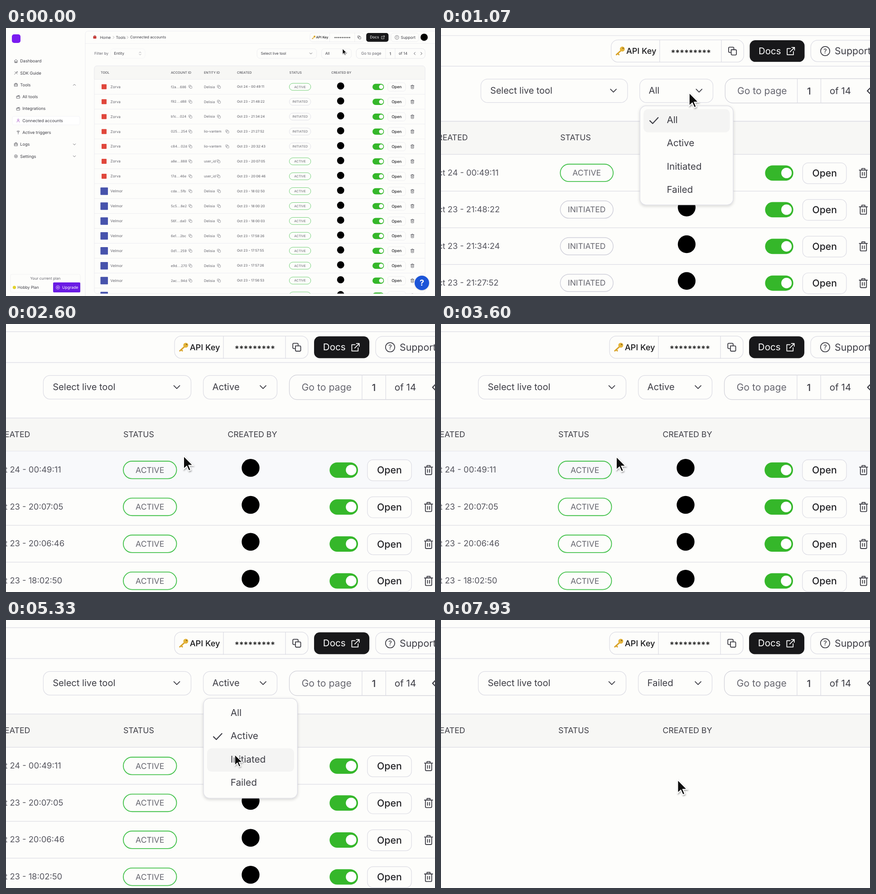
Animation, 947 px wide and 592 px high, one loop 8000 ms. Source, as an HTML page:

```html
<!DOCTYPE html>
<html lang="en">
<head>
<meta charset="utf-8">
<title>Connected accounts</title>
<style>
html, body { margin: 0; width: 100%; height: 100%; overflow: hidden; background: #fdfdfb; }
svg { display: block; width: 100vw; height: 100vh; font-family: Inter, "Open Sans", sans-serif; text-rendering: geometricPrecision; }
text { white-space: pre; }
</style>
</head>
<body>
<svg viewBox="0 0 947 592" preserveAspectRatio="none">
  <defs>
    <clipPath id="table"><rect x="195" y="83.7" width="730" height="503" rx="6"/></clipPath>
    <filter id="soft" x="-20%" y="-20%" width="140%" height="150%">
      <feDropShadow dx="0" dy="1" stdDeviation="1.2" flood-opacity=".16"/>
    </filter>
    <filter id="cursorShadow" x="-50%" y="-30%" width="220%" height="180%">
      <feDropShadow dx="0.6" dy="1.2" stdDeviation="0.9" flood-opacity=".35"/>
    </filter>
  </defs>
  <g id="camera">
    <g id="page"></g>
    <g id="rows" clip-path="url(#table)"></g>
    <g id="help"></g>
    <g id="filter"></g>
    <g id="cursor" filter="url(#cursorShadow)">
      <path d="M0 0V16L3.8 12.5 6.2 18 8.7 17 6.3 11.5H11.4Z" fill="#080808" stroke="#fff" stroke-width="1.1"/>
    </g>
  </g>
</svg>
<script>
const LOOP = 8000, ZOOM = 2.48, FOCUS_X = 873;
const ROW_TOP = 113.4, ROW_H = 32.92, ITEM_TOP = 72.8, ITEM_H = 20.77;
const INK = '#3d3d45', GREY = '#66666f', LINE = '#dcdce4', PAPER = '#fdfdfb';
const OPTIONS = ['All', 'Active', 'Initiated', 'Failed'];
const $ = id => document.getElementById(id);

// Drawing helpers; text is centred vertically on y.
const text = (s, x, y, size = 8.2, fill = INK, weight = 400, anchor = 'start') =>
  `<text x="${x}" y="${y + size * 0.36}" font-size="${size}" fill="${fill}" font-weight="${weight}" text-anchor="${anchor}">${s}</text>`;
const box = (x, y, w, h, r = 6, fill = PAPER, stroke = LINE, width = 0.5) =>
  `<rect x="${x}" y="${y}" width="${w}" height="${h}" rx="${r}" fill="${fill}" stroke="${stroke}" stroke-width="${width}"/>`;
const dot = (x, y, r, fill, stroke = 'none', width = 0.7) =>
  `<circle cx="${x}" cy="${y}" r="${r}" fill="${fill}" stroke="${stroke}" stroke-width="${width}"/>`;
const icon = (d, x, y, stroke = INK, width = 0.75) =>
  `<path transform="translate(${x} ${y})" d="${d}" fill="none" stroke="${stroke}" stroke-width="${width}" stroke-linecap="round" stroke-linejoin="round"/>`;

const DOWN = 'M-2.6-1.3L0 1.3 2.6-1.3', UP = 'M-2.6 1.3L0-1.3 2.6 1.3';
const LEFT = 'M1.3-2.7L-1.3 0 1.3 2.7', RIGHT = 'M-1.3-2.7L1.3 0-1.3 2.7';
const COPY = 'M-1.2-1.2H2.6Q3.5-1.2 3.5-.3V2.6Q3.5 3.5 2.6 3.5H-.3Q-1.2 3.5-1.2 2.6ZM-1.2 1.2H-2.6Q-3.5 1.2-3.5.3V-2.6Q-3.5-3.5-2.6-3.5H.3Q1.2-3.5 1.2-2.6V-1.2';
const TRASH = 'M-3.6-2.7H3.6M-1.4-2.7V-4.1H1.4V-2.7M-2.8-2.7V3.2Q-2.8 4-2 4H2Q2.8 4 2.8 3.2V-2.7M-.9-.6V2M.9-.6V2';
const EXTERNAL = 'M-.3-2.3H-3.2V3.3H2.4V.4M.9-3.3H3.4V-.8M3.4-3.3L-.6.7';
const HOUSE = 'M-3.6 0L0-3.7 3.6 0M-2.8-.8V3.6H2.8V-.8M-1 3.6V1H1V3.6';
const PEN = 'M-3.3 3.3L1.4-1.4M-2.3-2.8L3 2.5M2.5-3.2V-1.2M1.5-2.2H3.5';
const CASE = 'M-3.4-1H3.4V3.2H-3.4ZM-3-1.2L2.8-3M-1.4-1L-.8-2.4M1-1L1.6-2.7';
const BOX = 'M-3.2-2.3H3.2V3.2H-3.2ZM-1.3-2.3V-3.6H1.3V-2.3M-3.2.3H3.2';
const USER = 'M0-3.4A1.7 1.7 0 010 .1 1.7 1.7 0 010-3.4M-3 3.6Q-2.6.4 0 .6 2.6.4 3 3.6';
const SPARK = 'M0 3.6V-.8M0-.8L-3-2.6M0-.8L3-2.6M-1.8-3.4H1.8';
const GEAR = 'M0-3.6L3.1-1.8V1.8L0 3.6-3.1 1.8V-1.8ZM0-1.2A1.2 1.2 0 010 1.2 1.2 1.2 0 010-1.2';

function sidebar() {
  const items = [
    ['Dashboard', HOUSE, 0], ['SDK Guide', PEN, 0], ['Tools', BOX, 0, UP], ['All tools', CASE, 1],
    ['Integrations', CASE, 1], ['Connected accounts', USER, 1], ['Active triggers', SPARK, 1],
    ['Logs', BOX, 0, DOWN], ['Settings', GEAR, 0, DOWN]
  ];
  return box(13, 14, 19, 19, 5, '#7a1cf0', 'none') +
    box(14, 195, 149, 19, 4, '#fff', '#e6e6ee') +
    items.map(([label, shape, nested, arrow], i) => {
      const y = 73 + i * 26.3, x = nested ? 27 : 22;
      return icon(shape, x, y, i === 5 ? '#a04cc0' : INK) + text(label, x + 9.3, y, 9.15) +
        (arrow ? icon(arrow, 151, y) : '');
    }).join('') +
    box(10, 544, 154, 40, 3, PAPER, '#e6e6e8') + text('Your current plan', 87, 553, 8.2, GREY, 400, 'middle') +
    dot(18.5, 573, 3.6, '#e3d32c') + text('Hobby Plan', 25.5, 573, 8.7) +
    box(104, 562, 60, 22, 2, '#6a1be4', 'none') + dot(114.5, 573, 3.9, 'none', '#fff') +
    icon('M-1.8 0H1.8M0-1.8V1.8', 114.5, 573, '#fff') + text('Upgrade', 124, 573, 8.6, '#fff');
}

function topBar() {
  return icon('M175 592V14Q175 6.8 182 6.8H947M175 34.3H947', 0, 0, LINE, 0.5) +
    box(192.5, 18, 7, 5.5, 1, '#c73b36', 'none') + icon('M-1.5 0V-1.5H1.5V0', 196, 18, '#8d2b2b') +
    text('Home', 207.5, 20.5, 8.5) + icon(RIGHT, 237.5, 20.7, GREY, 0.5) +
    text('Tools', 242.5, 20.5, 8.5) + icon(RIGHT, 268.5, 20.7, GREY, 0.5) +
    text('Connected accounts', 274, 20.5, 8.1) +
    box(671, 10.7, 118.9, 19.9) + icon('M714.5 10.7V30.6M769.8 10.7V30.6', 0, 0, LINE, 0.5) +
    icon('M0 0L-4.7 4.2M-3.5 3.1L-2.5 4.2', 680.4, 19.7, '#d9a329', 1.2) + dot(681, 18.9, 2.2, '#e4b43a') +
    dot(681.7, 18.2, 0.6, '#8a651b') + text('API Key', 684.6, 20.6, 7.3, '#18181b', 500) +
    text('*********', 742.5, 22, 7.4, '#222', 600, 'middle') + icon(COPY, 779.8, 20.7) +
    box(795.2, 11, 49.2, 19.4, 5, '#18181a', 'none') + text('Docs', 803.2, 20.5, 8.3, '#fff') +
    icon(EXTERNAL, 832, 20.7, '#fff', 0.7) +
    box(850, 11, 61, 19.2) + dot(862.9, 20.7, 4.1, 'none', INK) + text('?', 862.9, 20.7, 5.8, INK, 500, 'middle') +
    text('Support', 871.4, 20.6, 8.6) + dot(923, 20.4, 8, '#000');
}

function toolBar() {
  return text('Filter by', 195, 56.2, 8.2, GREY) + box(231, 45.8, 76, 21.1, 6, PAPER, '#ececf0') +
    text('Entity', 238.5, 56, 8.4) + icon('M-2-1.4L0-3.4 2-1.4M-2 1.4L0 3.4 2 1.4', 296, 56.2, GREY, 0.6) +
    box(554.2, 45.8, 131.5, 21.1) + text('Select live tool', 562.6, 55.9, 8.1) + icon(DOWN, 673, 56.2) +
    box(773.2, 45.4, 152, 21.9, 7, PAPER, '#cfcfd8') + icon('M837.9 45.4V67.3M859 45.4V67.3', 0, 0, LINE, 0.5) +
    text('Go to page', 784.1, 56.2, 8.55, GREY) + text('1', 848.4, 56.5, 8.6, INK, 500, 'middle') +
    text('of 14', 866.9, 56.4, 8.3) + icon(LEFT, 902, 56.4, INK, 0.9) + icon(RIGHT, 917, 56.4, INK, 0.9);
}

function tableFrame() {
  const columns = [['TOOL', 209], ['ACCOUNT ID', 364], ['ENTITY ID', 437], ['CREATED', 510], ['STATUS', 625.4], ['CREATED BY', 718.3]];
  return box(195, 83.7, 730, 503) +
    `<path d="M195 113.4V90Q195 83.7 201 83.7H919Q925 83.7 925 90V113.4Z" fill="#f7f7f5" stroke="${LINE}" stroke-width=".5"/>` +
    columns.map(([label, x]) => text(label, x, 98.1, 7.15, INK)).join('');
}

const helpButton = () =>
  `<g filter="url(#soft)">${dot(918, 563, 16, '#1e55d8')}</g>` + text('?', 918, 563, 18, '#fff', 700, 'middle');

const NAMES = { d: 'Delisia', l: 'lio-vantem', u: 'user_id' };
const ICON_X = { d: 470, l: 488.5, u: 469 };
const ACCOUNTS = `f2a 686 d 24 00:49:11 A
f92 d88 d 23 21:48:22 I
b1c 024 d 23 21:34:24 I
025 254 l 23 21:27:52 I
c84 02d l 23 20:32:43 I
a8e 888 u 23 20:07:05 A
17d 46e u 23 20:06:46 A
cda 5fb d 23 18:02:50 A
5c5 8e2 d 23 18:00:20 A
56f da0 d 23 18:00:03 A
6e1 2bc d 23 17:58:26 A
0d1 259 d 23 17:57:55 A
e9d 270 d 23 17:57:26 A
2ac 94d d 23 17:56:53 A
7b3 41f d 23 17:56:20 A`.split('\n').map((line, i) => {
  const [head, tail, who, day, time, status] = line.split(' ');
  return { head, tail, who, day, time, active: status === 'A', mail: i < 7 };
});

function accountRow(a, i, hovered) {
  const y = ROW_TOP + (i + 0.5) * ROW_H, label = a.active ? 'ACTIVE' : 'INITIATED';
  return (i === hovered ? box(195.3, y - ROW_H / 2, 729.4, ROW_H, 0, '#f8f9fb', 'none') : '') +
    icon(`M195 ${y + ROW_H / 2}H925`, 0, 0, LINE, 0.5) +
    (a.mail ? box(211, y - 5.5, 11, 11, 1, '#e0473c', 'none') : box(208.5, y - 8, 16.5, 16.5, 1, '#4753ac', 'none')) +
    text(a.mail ? 'Zorva' : 'Velmor', 230.5, y, 8.2, GREY) +
    text(`${a.head}....${a.tail}`, 364, y, 7.5, GREY) + icon(COPY, 407, y, GREY, 0.6) +
    text(NAMES[a.who], 437, y, 7.7, GREY) + icon(COPY, ICON_X[a.who], y, GREY, 0.6) +
    text(`Oct ${a.day} - ${a.time}`, 510, y - 0.2, 7.4, '#55555e') +
    box(625.4, y - 7.7, 47.4, 15.6, 7.8, 'none', a.active ? '#46c24d' : '#cfcfda', a.active ? 0.75 : 0.6) +
    text(label, 649.1, y + 0.1, 7.1, GREY, 400, 'middle') +
    dot(738.7, y - 1.7, 7.95, '#000') +
    box(809, y - 6.6, 25.3, 13.7, 6.8, '#35b72a', 'none') + dot(828.2, y + 0.2, 4.7, '#fff') +
    box(842.7, y - 8.9, 39.2, 18.7, 5) + text('Open', 862.3, y + 0.3, 8.6, '#222226', 500, 'middle') +
    icon(TRASH, 897.1, y + 0.3);
}

const tableRows = (filter, hovered) => ACCOUNTS
  .filter(a => filter === 0 || (filter === 1 && a.active) || (filter === 2 && !a.active))
  .map((a, i) => accountRow(a, i, hovered)).join('');

function statusFilter(selected, open, hovered) {
  const select = box(696.6, 45.8, 65.7, 21.1) + text(OPTIONS[selected], 704.7, 55.9, 8.2) + icon(DOWN, 749.8, 56.2);
  if (!open) return select;
  return select + `<g filter="url(#soft)">${box(696.8, 69.8, 83.6, 88.9, 5.5)}</g>` +
    box(700, ITEM_TOP + hovered * ITEM_H, 77.4, ITEM_H, 4, '#f4f4f3', 'none') +
    OPTIONS.map((name, i) => text(name, 720.9, 82.4 + i * ITEM_H, 8.35)).join('') +
    icon('M-3.7.2L-1.2 2.7 3.7-2.6', 709.4, 83 + selected * ITEM_H, INK, 0.9);
}

// Pointer stops: time, x, y in page units.
const STOPS = [[0, 743, 46], [600, 741.4, 48.8], [900, 741.4, 48.8], [1500, 738.7, 98], [1850, 738.7, 98],
  [2700, 677, 118.1], [3700, 677, 118.1], [4350, 736, 57], [4700, 736, 57], [5220, 724.6, 119.8],
  [5500, 724.6, 119.8], [6250, 735, 63.3], [6700, 735, 63.3], [7200, 731.6, 142.3], [LOOP, 731.6, 142.3]];
const CLICKS = [300, 1670, 4480, 5330, 6400, 7380];
const PICKS = [[1670, 1], [5330, 2], [7380, 3]];

function pointerAt(t) {
  const i = STOPS.findIndex(s => s[0] > t), [t0, x0, y0] = STOPS[i - 1], [t1, x1, y1] = STOPS[i];
  const k = (1 - Math.cos(Math.PI * (t - t0) / (t1 - t0))) / 2;
  return [x0 + (x1 - x0) * k, y0 + (y1 - y0) * k];
}
const pickedBy = t => PICKS.reduce((value, [at, option]) => t >= at ? option : value, 0);

const shown = {};
function show(id, key, render) {
  if (shown[id] === key) return;
  shown[id] = key;
  $(id).innerHTML = render();
}

function draw(t) {
  const spring = t * 0.006;
  const zoom = 1 + (ZOOM - 1) * (1 - (1 + spring) * Math.exp(-spring));
  $('camera').setAttribute('transform', `translate(${FOCUS_X * (1 - zoom)} 0) scale(${zoom})`);

  const [x, y] = pointerAt(t);
  const open = CLICKS.filter(c => t >= c + 80).length % 2 === 1;
  const item = Math.max(0, Math.min(3, Math.floor((y - ITEM_TOP) / ITEM_H)));
  const row = open ? -1 : Math.floor((y - ROW_TOP) / ROW_H);
  const selected = pickedBy(t - 80), filter = pickedBy(t - 300);
  show('rows', `${filter}/${row}`, () => tableRows(filter, row));
  show('filter', `${selected}/${open}/${item}`, () => statusFilter(selected, open, item));

  const press = Math.max(0, ...CLICKS.map(c => 1 - Math.abs(t - c) / 150));
  $('cursor').setAttribute('transform', `translate(${x} ${y}) scale(${0.74 * (1 - 0.18 * press)})`);
}

$('page').innerHTML = sidebar() + topBar() + toolBar() + tableFrame();
$('help').innerHTML = helpButton();

const start = performance.now();
function tick() {
  draw((performance.now() - start) % LOOP);
  requestAnimationFrame(tick);
}
tick();
</script>
</body>
</html>
```
